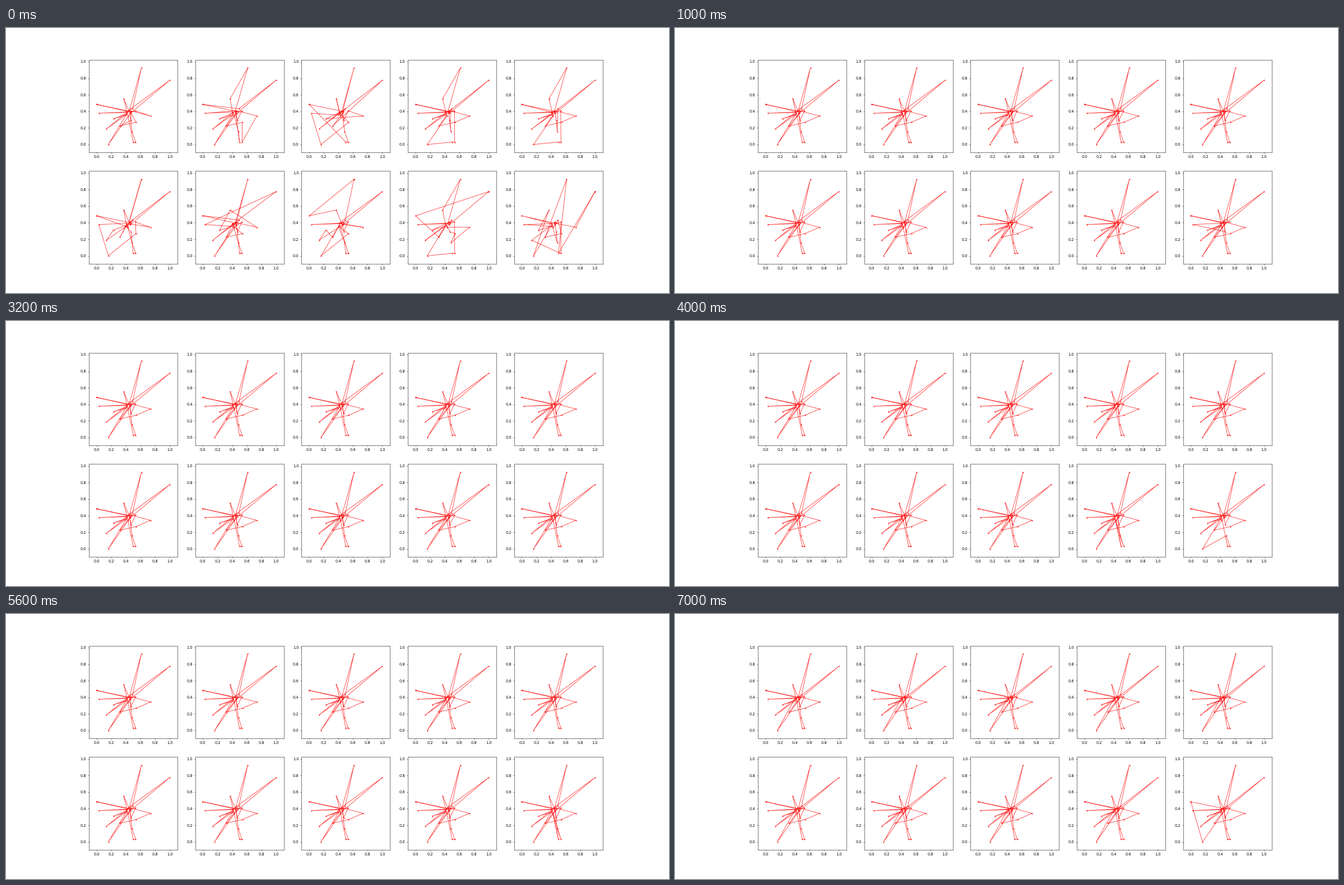
Animation, 1183 px wide and 473 px high, one loop 8 s. Source, as a matplotlib script:

```python
import matplotlib.pyplot as plt
import numpy as np
from matplotlib.animation import FuncAnimation

DPI = 48
STEP_MS = 1000
STEPS = 8

# Upper case: outlying stops. Lower case: stops crowded around the centre.
STOPS = {
    "A": (0, .483), "B": (.03, .377), "C": (.371, .552), "D": (.612, .922),
    "E": (1, .774), "F": (.737, .344), "G": (.538, .268), "H": (.535, .028),
    "I": (.5, .03), "J": (.16, 0), "K": (.135, .188), "L": (.229, .31),
    "M": (.32, .224), "N": (.484, .157), "O": (.471, .291), "P": (.532, .407),
    "a": (.44, .395), "b": (.413, .387), "c": (.4, .355), "d": (.412, .37),
    "e": (.46, .375), "f": (.405, .392), "g": (.445, .402), "h": (.428, .345),
    "i": (.452, .385), "j": (.46, .408), "k": (.47, .397), "l": (.492, .432),
}

FIRST_TOURS = [
    "AaBbKcLdJeEflDgChIHNiPFjGMOk",
    "AlEeJdbKcLaDCfBjFHGMiOPhNIgk",
    "AIHNiOPFLaKbChDjEMelgdcBJGfk",
    "AaBbKcLdEegDChJIHPiNOlMGFjfk",
    "AbBaKcLdEegDChJIHPlNOiMGFjfk",
    "AhaDgEeCfBJGPFiKLdMbNHIOcjlk",
    "AaKbEBcLCFgDjJeIHNfMGhPOidkl",
    "DACaBbFfEeKLMdJGcNIHhPOigjkl",
    "EAMaBbLcKdJIHPgDCfOGNFhijkle",
    "EFaAbBcLCJdKHPiONfhejgklGMDI",
]
BEST = "AaBbKcLdJeEflDgChIHNiOPjFGMk"


def rewire(tour, p, q):
    """Join p to q by reversing the stretch that follows p up to q."""
    i, j = tour.index(p) + 1, tour.index(q) + 1
    return tour[:i] + tour[i:j][::-1] + tour[j:]


BETTER = rewire(BEST, "d", "E")

# Per step: panel -> joined pair that sets it apart from the best tour.
MUTATIONS = {
    1: {9: "BO"},
    4: {8: "CI", 9: "JN"},
    5: {9: "CI"},
    6: {9: "DN"},
    7: {9: "AJ"},
}


def tour_at(step, panel):
    if step == 0:
        return FIRST_TOURS[panel]
    improved = step == 7 or (step == 6 and panel == 0)
    tour = BETTER if improved else BEST
    pair = MUTATIONS.get(step, {}).get(panel)
    return rewire(tour, *pair) if pair else tour


def path(tour):
    return np.array([STOPS[s] for s in tour + tour[0]]).T


plt.rcParams.update({"font.family": "DejaVu Sans", "font.size": 10})
fig, axes = plt.subplots(2, 5, figsize=(1183 / DPI, 473 / DPI), dpi=DPI)
lines = []
for ax in axes.flat:
    ax.set(xlim=(-.106, 1.106), ylim=(-.097, 1.0215),
           xticks=np.arange(6) / 5, yticks=np.arange(6) / 5)
    lines += ax.plot([], [], "ro-", lw=1.3, ms=3.6, mew=0, alpha=.75)


def update(step):
    for panel, line in enumerate(lines):
        line.set_data(*path(tour_at(step, panel)))
    return lines


anim = FuncAnimation(fig, update, frames=STEPS, interval=STEP_MS,
                     repeat=True, repeat_delay=0)
plt.show()
```
